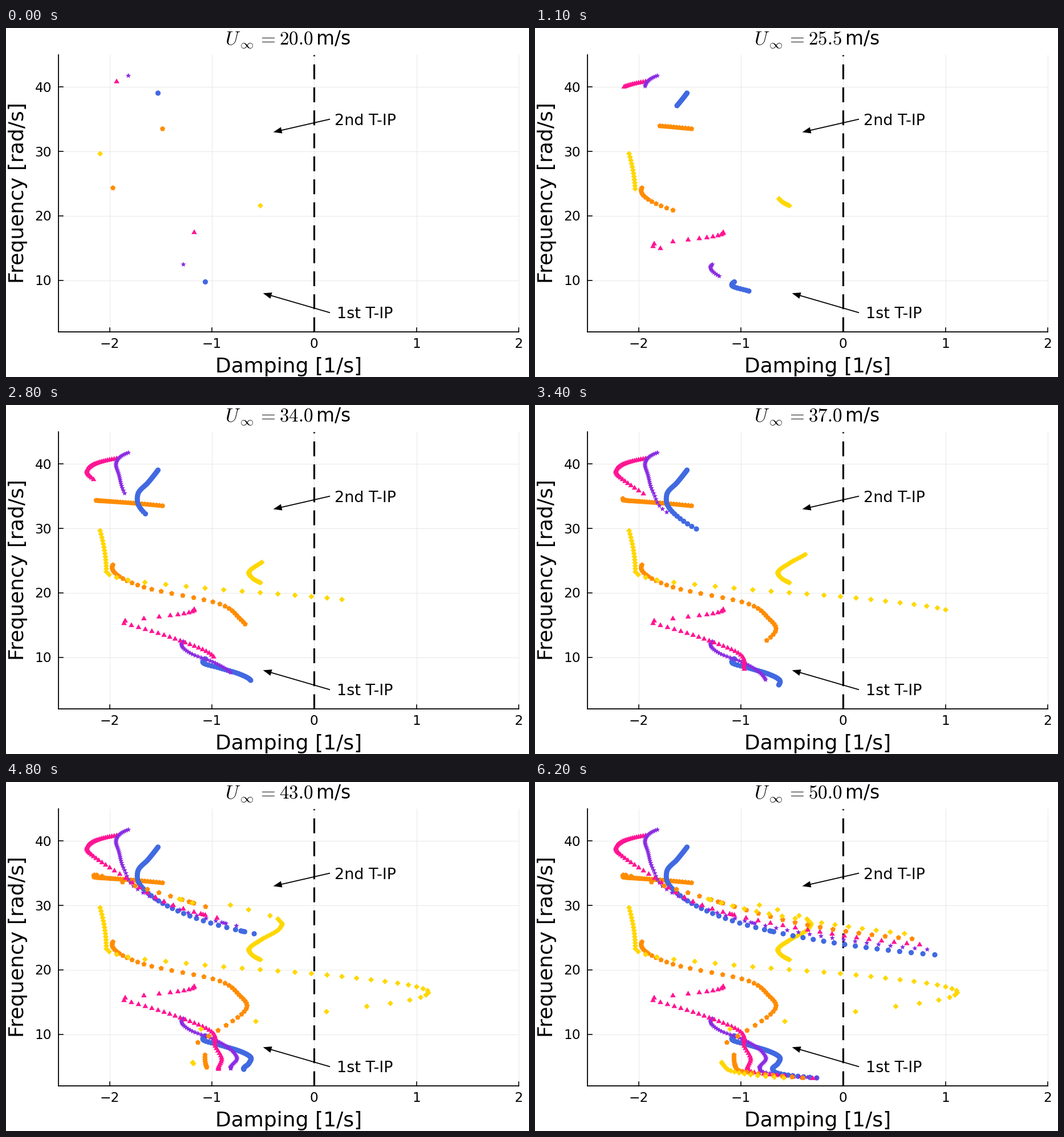
Write a matplotlib script that moves like this. It is 917x611 px and loops after 6300 ms.

```python
import numpy as np
import matplotlib.pyplot as plt
from matplotlib.animation import FuncAnimation
from matplotlib.collections import PathCollection
from matplotlib.patches import Polygon
from matplotlib.path import Path
from matplotlib.transforms import Affine2D, IdentityTransform

W, H, DPI = 917, 611, 64
PX = 72 / DPI  # points per pixel
LEFT, RIGHT, TOP, BOTTOM = 92, 899, 47, 532

plt.rcParams["font.family"] = "DejaVu Sans"
plt.rcParams["mathtext.fontset"] = "cm"

# Airspeed steps of 0.5 m/s, refined just before 42.5 m/s
STEPS = np.concatenate([np.arange(45), [44.6, 44.8], np.arange(45, 61)])


def px(x):
    return LEFT + (x + 2.5) * (RIGHT - LEFT) / 4.5


def py(y):
    return BOTTOM - (y - 2) * (BOTTOM - TOP) / 43


def hermite(n, v, steps):
    slope = np.gradient(v, n, edge_order=2)
    i = np.clip(np.searchsorted(n, steps, "right") - 1, 0, len(n) - 2)
    h = n[i + 1] - n[i]
    t = (steps - n[i]) / h
    return ((1 + 2 * t) * (1 - t) ** 2 * v[i] + t * (1 - t) ** 2 * h * slope[i]
            + t * t * (3 - 2 * t) * v[i + 1] + t * t * (t - 1) * h * slope[i + 1])


def curve(*keys):
    """Smooth run through (step, x, y) keys, sampled at the steps they span."""
    n, x, y = np.array(keys, float).T
    steps = STEPS[(STEPS >= n[0]) & (STEPS <= n[-1])]
    return np.column_stack([hermite(n, x, steps), hermite(n, y, steps)])


# Every branch ends in a fan that depends only on the configuration index
def low_end(i):
    return (52, 426 - 20.7 * i, 510 - 1.1 * i), (60, 494 - 0.9 * i ** 3, 518)


def high_end(i):
    return ((52, 543 - 21.7 * i, 284.5 - 11.4 * i),
            (60, 701 - 13.3 * i, 302.5 - 9.3 * i))


blue_low = curve((0, 349.5, 444.5), (4, 345.5, 451), (11, 375, 460.5),
                 (19, 408, 470.5), (28, 429, 482), (36, 426, 492.5),
                 (46, 417, 503), *low_end(0))
blue_high = curve((0, 266.5, 114), (11, 249, 136), (19, 231, 157),
                  (24, 232.5, 175.5), (28, 244.5, 190.5), (34, 283, 217),
                  (41, 359, 247), *high_end(0))

purple_low = curve((0, 311, 414), (5, 308.3, 422), (11, 323, 434.5),
                   (19, 363, 450), (28, 394, 468.5), (35, 405, 483),
                   (45, 394, 500.5), *low_end(1))
purple_high = curve((0, 214.5, 83.5), (11, 193, 102), (19, 198, 122),
                    (28, 208, 154.5), (33, 223.5, 182), (41, 319.5, 229),
                    *high_end(1))

# Branches with a sharp corner or a jump are made of several runs
pink_low = np.vstack([
    curve((0, 330, 357), (4, 312, 364.5), (7, 268.5, 370), (9, 209, 377)),
    curve((10, 207, 381.5), (19, 305.5, 412), (28, 364, 440), (34, 367, 461.5),
          (39, 378, 482), (45, 372.5, 500), *low_end(2))])
pink_high = curve((0, 194, 93), (7, 167.5, 98.5), (14, 150, 105.5),
                  (22, 142.2, 117), (28, 153.5, 129.5), (35, 199.5, 160.5),
                  (41, 277, 208.5), *high_end(2))

orange_low = np.vstack([
    curve((0, 187.5, 280), (4, 190, 293), (11, 242, 319), (19, 375, 348.5),
          (25, 408, 372), (31.5, 420, 399), (36, 386, 426), (39, 336.5, 456)),
    curve((40, 349, 478), (46, 352, 499.5), *low_end(3))])
orange_high = curve((0, 274.5, 176.5), (11, 219, 171.5), (19, 184, 169),
                    (28, 158, 167), (32, 154.5, 165.8), (37, 168.5, 165),
                    (41, 248, 188), *high_end(3))

gold_low = np.vstack([
    curve((0, 165, 220), (8, 174.3, 265.5), (13, 176, 292)),
    curve((14, 181, 297), (16, 214, 306.5), (19, 316, 317.5), (28, 589, 340.5),
          (34, 720, 358.5), (37, 740.5, 369), (41, 674, 387.5), (43, 562, 402),
          (44.6, 342, 432.5)),
    curve((44.8, 327.5, 491), (48, 331.7, 497), *low_end(4))])
gold_high = np.vstack([
    curve((0, 446, 311), (11, 428, 299), (19, 427.5, 290), (28, 448.5, 275.5),
          (37, 481.5, 254), (41, 480, 243.5), (43, 463, 234),
          (44.6, 393.5, 215.5)),
    curve((44.8, 304, 205), (48, 367, 222), *high_end(4))])

fig = plt.figure(figsize=(W / DPI, H / DPI), dpi=DPI, facecolor="white")
ax = fig.add_axes([0, 0, 1, 1])
ax.set(xlim=(0, W), ylim=(H, 0))
ax.axis("off")


def line(x0, y0, x1, y1, width, color="black", **kw):
    ax.plot([x0, x1], [y0, y1], color=color, lw=width * PX, **kw)


def label(x, y, text, size, ha="center", **kw):
    return ax.text(x, y, text, fontsize=size * PX, ha=ha, va="baseline", **kw)


def arrow(x0, y0, x1, y1):
    start, tip = np.array([px(x0), py(y0)]), np.array([px(x1), py(y1)])
    along = (tip - start) / np.hypot(*(tip - start))
    side = along[::-1] * (-1, 1)
    base = tip - 15 * along
    line(*start, *base, 1.8)
    ax.add_patch(Polygon([tip, base + 5.6 * side, base - 5.6 * side],
                         fc="black", ec="none", zorder=3))


# Grid, ticks and tick labels
for v in range(-2, 3):
    line(px(v), TOP, px(v), BOTTOM, 1, "#e8e8e8")
    line(px(v), BOTTOM, px(v), BOTTOM - 7.5, 1.6)
    label(px(v), 560.5, str(v).replace("-", "\u2212"), 23.3)
for v in (10, 20, 30, 40):
    line(LEFT, py(v), RIGHT, py(v), 1, "#e8e8e8")
    line(LEFT, py(v), LEFT + 7.5, py(v), 1.6)
    label(80, py(v) + 8.5, str(v), 23.3, ha="right")
line(LEFT, TOP, LEFT, BOTTOM, 1.8, solid_capstyle="projecting")
line(LEFT, BOTTOM, RIGHT, BOTTOM, 1.8, solid_capstyle="projecting")
line(px(0), BOTTOM, px(0), TOP, 3.2, linestyle=(0, (26 / 3.2, 14.25 / 3.2)))

label(495.5, 602.5, "Damping [1/s]", 36.1)
label(31, 289, "Frequency [rad/s]", 36.1, rotation=90, rotation_mode="anchor")
arrow(0.15, 35, -0.4, 33)
arrow(0.15, 5, -0.5, 8)
label(px(0.5) - 0.5, 169.7, "2nd T-IP", 27)
label(px(0.5) - 0.5, 508, "1st T-IP", 27)

label(383.5, 28.5, "$U$", 33.3, ha="left")
label(422, 34.5, r"$\infty$", 23.3)
label(457, 28.5, "$=$", 33.3)
speed = label(508.5, 28.5, "", 33.3)
label(543.8, 28.5, "m/s", 33, ha="left")


def marker(path, radius, drop=0):
    return path.transformed(Affine2D().scale(radius).translate(0, -drop))


SERIES = [
    ("royalblue", marker(Path.unit_circle(), 4.6), blue_low, blue_high),
    ("blueviolet", marker(Path.unit_regular_star(5, 0.45), 4.8),
     purple_low, purple_high),
    ("deeppink", marker(Path.unit_regular_polygon(3), 5.6, 1),
     pink_low, pink_high),
    ("darkorange", marker(Path.unit_regular_polygon(5), 4.8),
     orange_low, orange_high),
    ("gold", marker(Path.unit_regular_polygon(4), 5),
     gold_low, gold_high),
]

# One row of ten markers per step; shapes and colours cycle along the row
points = np.stack([b for s in SERIES for b in s[2:]], axis=1)
dots = PathCollection(
    [s[1] for s in SERIES for _ in range(2)], sizes=[PX ** 2],
    facecolors=[s[0] for s in SERIES for _ in range(2)], edgecolors="none",
    linewidths=0, offsets=points[0], offset_transform=ax.transData, zorder=5)
dots.set_transform(IdentityTransform())  # marker outlines are in pixels
ax.add_collection(dots, autolim=False)


def draw(k):
    dots.set_offsets(points[:k + 1].reshape(-1, 2))
    speed.set_text(f"${20 + STEPS[k] / 2:.1f}$")
    return dots, speed


anim = FuncAnimation(fig, draw, frames=len(STEPS), interval=100,
                     repeat=True, repeat_delay=0, blit=False)
plt.show()
```
